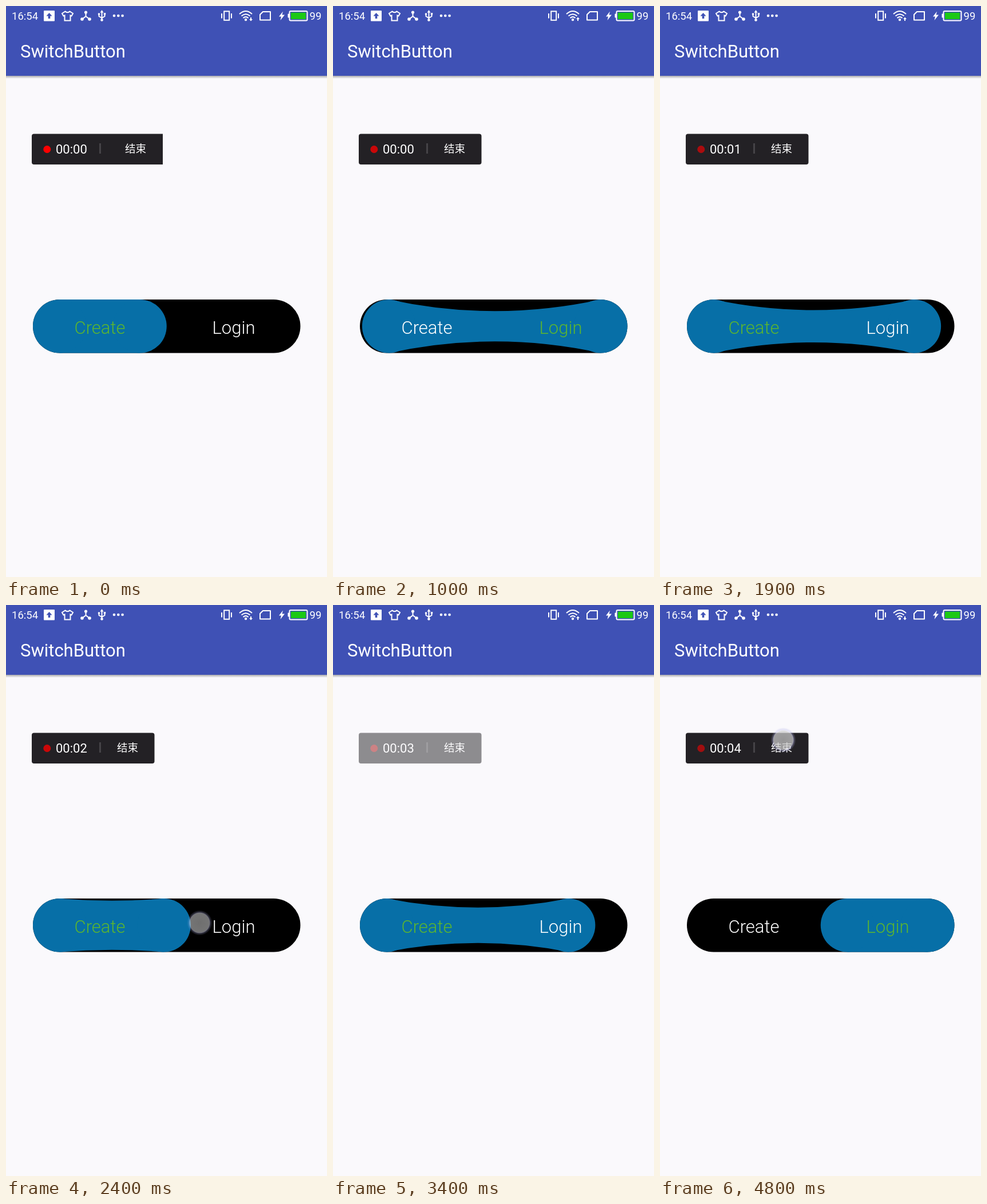
Write an HTML page that moves like this. It is 561 by 998 pixels and loops after 4.9 s.

```html
<!DOCTYPE html>
<html lang="en">
<head>
<meta charset="utf-8">
<title>SwitchButton</title>
<style>
html, body { margin: 0; width: 100%; height: 100%; overflow: hidden; background: #faf9fc; }
svg { display: block; width: 100%; height: 100%; }
text { font-family: Roboto, "Noto Sans", sans-serif; fill: #fff; }
.line { fill: none; stroke: #fff; stroke-width: 2; }
.label { font-size: 31px; font-weight: 300; text-anchor: middle; }
.status { font-size: 18.5px; }
#end { font: 18.5px "Noto Sans CJK SC", "Noto Sans CJK", sans-serif; }
</style>
</head>
<body>
<svg viewBox="0 0 561 998">
  <defs>
    <linearGradient id="shade" x2="0" y2="1">
      <stop offset="0" stop-color="#777" stop-opacity=".6"/>
      <stop offset="1" stop-color="#777" stop-opacity="0"/>
    </linearGradient>
    <radialGradient id="glow">
      <stop offset="0" stop-color="#bdbdbd" stop-opacity=".75"/>
      <stop offset=".72" stop-color="#cfcfcf" stop-opacity=".72"/>
      <stop offset=".79" stop-color="#e4e4f4" stop-opacity=".65"/>
      <stop offset=".84" stop-color="#b4b4ea" stop-opacity=".35"/>
      <stop offset="1" stop-color="#b4b4ea" stop-opacity="0"/>
    </radialGradient>
  </defs>

  <rect width="561" height="998" fill="#faf9fc"/>
  <rect width="561" height="122" fill="#3f51b5"/>
  <rect y="122" width="561" height="5" fill="url(#shade)"/>
  <text x="25" y="90" font-size="31">SwitchButton</text>

  <g fill="#fff">
    <text class="status" x="10" y="23.5">16:54</text>
    <rect x="66" y="8" width="19" height="18.5" rx="1"/>
    <path d="M75.5 12l5 5.5h-3.2v4.500h-3.600v-4.500h-3.200z" fill="#3f51b5"/>
    <path class="line" d="M103.500 9.500Q107.500 13 111.500 9.500L117 13L114.500 17.500L112.500 16.500V25.500H102.500V16.500L100.500 17.500L98 13Z"/>
    <path class="line" d="M139.500 11V18L133 23M139.500 18L146 23"/>
    <circle cx="139.500" cy="11" r="2.600"/>
    <circle cx="133" cy="23" r="2.800"/>
    <circle cx="146" cy="23" r="2.800"/>
    <path class="line" stroke-width="1.500" d="M167.500 10V25M162.500 14V18L167.500 21L172.500 18V13"/>
    <path d="M167.500 7l3 4.500h-6z"/>
    <circle cx="167.500" cy="24.500" r="2.300"/>
    <circle cx="162.500" cy="14" r="1.800"/>
    <rect x="170.800" y="12" width="3.400" height="3.400"/>
    <circle cx="189" cy="17" r="2.300"/>
    <circle cx="196.300" cy="17" r="2.300"/>
    <circle cx="203.600" cy="17" r="2.300"/>

    <rect class="line" x="381.200" y="9.300" width="9" height="15.500" stroke-width="2.800"/>
    <path class="line" d="M377 13V21.500M394 13V21.500"/>
    <path class="line" d="M408 14Q419 4 430 14M411.500 17.500Q419 11 426.500 17.500M414.500 21Q419 17 423.500 21"/>
    <circle cx="419" cy="24" r="2.200"/>
    <path id="traffic"/>
    <path class="line" d="M449 10H462V24.500H444V15Z" stroke-linejoin="round"/>
    <path d="M484 9.500l-7 9h4l-1.500 6.500l7.500-9.500h-4.500z"/>
    <rect x="492.500" y="13.500" width="3" height="7" rx="1"/>
    <rect class="line" x="495.500" y="9" width="31" height="16.500" rx="2"/>
    <rect x="498" y="11.500" width="26" height="11.500" fill="#1cc914"/>
    <text class="status" x="530.500" y="23.500">99</text>
  </g>

  <g id="panel">
    <path id="panelBack" fill="#232125"/>
    <circle id="rec" cx="71.800" cy="250.500" r="6.500" fill="#f00"/>
    <text id="clock" x="87" y="257.500" font-size="22"></text>
    <rect x="163" y="240" width="3" height="18" fill="#454347"/>
    <text id="end" y="256">结束</text>
  </g>

  <rect x="47" y="513" width="467.500" height="93.500" rx="46.750"/>
  <g fill="#076fa7">
    <path id="neck"/>
    <circle id="leftCap" cy="559.750" r="46.750"/>
    <circle id="rightCap" cy="559.750" r="46.750"/>
  </g>
  <text id="create" class="label" x="164" y="572.500">Create</text>
  <text id="login" class="label" x="398" y="572.500">Login</text>
  <circle id="touch" r="22" fill="url(#glow)"/>
</svg>
<script>
const LOOP = 4900, STEP = 100, HALF = 300;
const LEFT = 47, RIGHT = 514.5, MID = 280.75, TOP = 513, BOTTOM = 606.5, R = 46.75;
const GREEN = '#5bb530';

const taps = [
  { at: 695, toRight: true, x: 365, y: 560 },
  { at: 1570, toRight: false, x: 185, y: 577 },
  { at: 2346, toRight: true, x: 338.5, y: 555.5 },
  { at: 3028, toRight: false, x: 185, y: 570 },
  { at: 3918, toRight: true, x: 345, y: 560 }
];
const panelTap = { at: 4770, x: 215.5, y: 236 };

const $ = id => document.getElementById(id);
const set = (id, attrs) => {
  for (const key in attrs) $(id).setAttribute(key, attrs[key]);
};
const clamp = v => Math.max(0, Math.min(1, v));

// The leading edge stretches across first, then the trailing edge follows.
function knobAt(t) {
  const tap = taps.filter(p => p.at <= t).pop();
  if (!tap) return { left: LEFT, right: MID, onRight: false };
  const lead = clamp((t - tap.at) / HALF);
  const trail = clamp((t - tap.at - HALF) / HALF);
  const span = MID - LEFT;
  return tap.toRight
    ? { left: LEFT + span * trail, right: MID + span * lead, onRight: lead === 1 }
    : { left: MID - span * lead, right: RIGHT - span * trail, onRight: lead < 1 };
}

function drawSwitch(t) {
  const { left, right, onRight } = knobAt(t);
  const a = left + R, b = right - R, mid = (a + b) / 2;
  const dip = 0.176 * (right - left - (MID - LEFT));
  set('leftCap', { cx: a });
  set('rightCap', { cx: b });
  set('neck', {
    d: `M${a} ${TOP}Q${mid} ${TOP + dip} ${b} ${TOP}V${BOTTOM}Q${mid} ${BOTTOM - dip} ${a} ${BOTTOM}Z`
  });
  $('create').style.fill = onRight ? '#fff' : GREEN;
  $('login').style.fill = onRight ? GREEN : '#fff';
}

function drawPanel(t) {
  const opening = t < 100;
  set('panel', { opacity: t >= 3200 && t < 4700 ? 0.5 : 1 });
  set('panelBack', {
    d: opening
      ? 'M274 223.500V277H49q-4 0-4-4V227.500q0-4 4-4Z'
      : 'M49 223.500H255.500q4 0 4 4V273q0 4-4 4H49q-4 0-4-4V227.500q0-4 4-4Z'
  });
  set('end', { x: opening ? 208 : 194 });
  set('rec', { opacity: 0.78 + 0.22 * Math.cos(2 * Math.PI * (t + 30) / 1400) });
  $('clock').textContent = '00:0' + Math.max(0, Math.floor((t - 150) / 1000));
}

function drawTouch(t) {
  const tap = [...taps, panelTap].find(p => t > p.at - 110 && t < p.at + 140);
  if (!tap) return set('touch', { opacity: 0 });
  set('touch', { cx: tap.x, cy: tap.y, opacity: clamp(1 - (t - tap.at - 30) / 110) });
}

function draw(t) {
  const upload = (t >= 700 && t < 2000) || (t >= 2700 && t < 3700);
  set('traffic', {
    d: upload ? 'M428 19.500l3 3.500h-2v3h-2v-3h-2z' : 'M428 26.500l3-3.500h-2v-3h-2v3h-2z'
  });
  drawPanel(t);
  drawSwitch(t);
  drawTouch(t);
}

const start = performance.now();
function tick() {
  const t = (performance.now() - start) % LOOP;
  draw(Math.floor(t / STEP) * STEP);
  requestAnimationFrame(tick);
}
tick();
</script>
</body>
</html>
```
